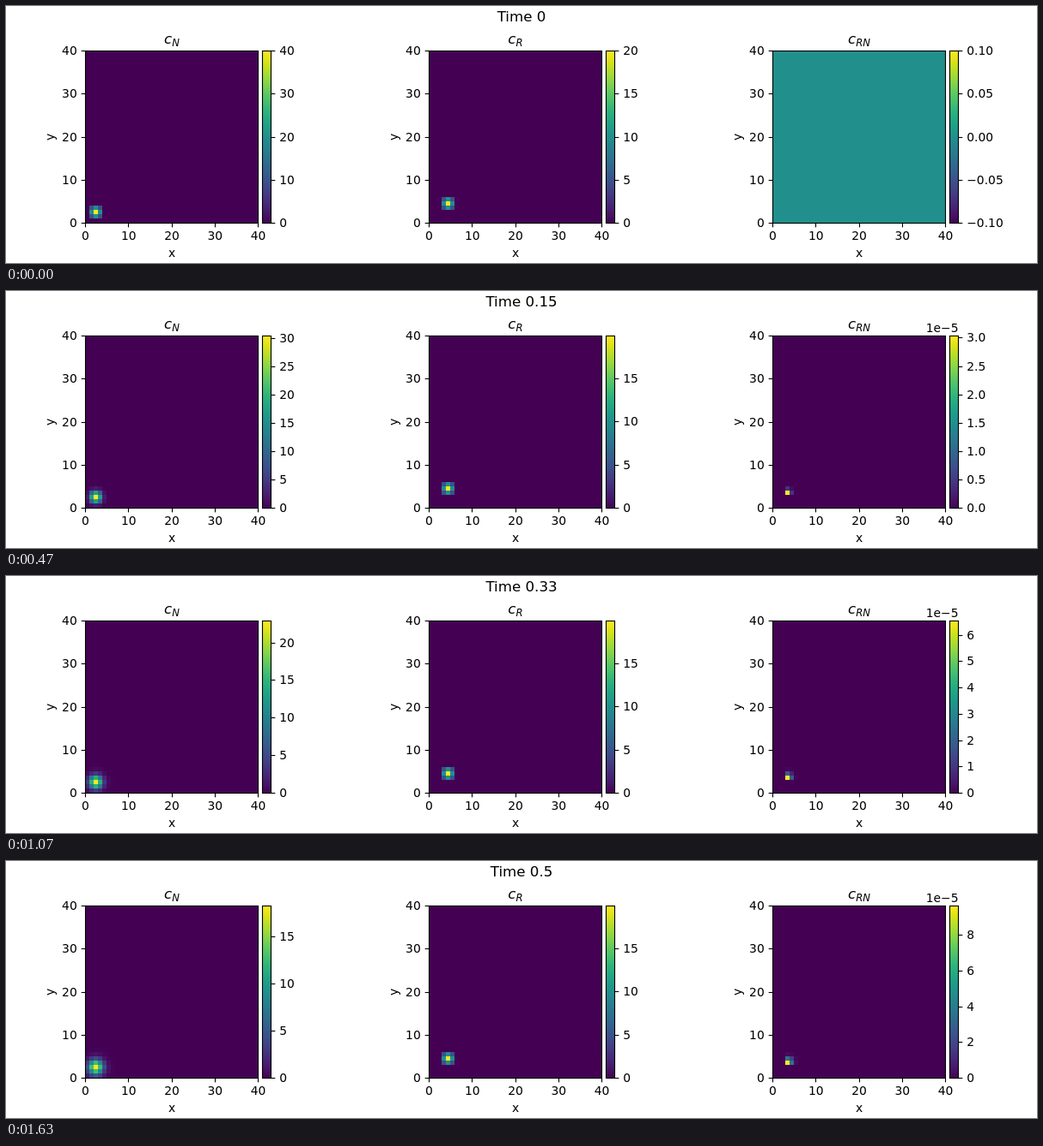
Write an HTML page with a canvas that moves like this. It is 1200 px wide and 300 px high and loops after 1660 ms.

```html
<!DOCTYPE html>
<html lang="en">
<head>
<meta charset="utf-8">
<title>Reaction and diffusion</title>
<style>
html, body { margin: 0; width: 1200px; height: 300px; overflow: hidden; background: #fff; }
canvas { display: block; }
</style>
</head>
<body>
<canvas id="stage" width="1200" height="300"></canvas>
<script>
const ctx = document.getElementById('stage').getContext('2d');
const LOOP = 1660, CELLS = 40, DT = 0.01, STEPS = 50;
const LEFT = 92.5, TOP = 52.5, SIZE = 201, BOTTOM = TOP + SIZE;
const BAR_X = 298.5, BAR_W = 10, TICK = 4.86, LINE = 1.11;
const SMALL = 13.89, LARGE = 16.67;

// Viridis, evenly spaced stops
const STOPS = ('440154 481769 472a7a 433d84 3d4e8a 355e8d 2e6d8e 297b8e 23898e ' +
  '1f978b 21a585 2db27d 46c06f 65cb5e 8bd646 b2dd2d dae319 fde725').split(' ')
  .map(hex => [0, 2, 4].map(i => parseInt(hex.slice(i, i + 2), 16)));

function viridis(v) {
  const p = Math.min(Math.max(v, 0), 1) * (STOPS.length - 1);
  const i = Math.min(Math.floor(p), STOPS.length - 2);
  return `rgb(${STOPS[i].map((c, j) => Math.round(c + (STOPS[i + 1][j] - c) * (p - i)))})`;
}

const barFill = ctx.createLinearGradient(0, BOTTOM, 0, TOP);
STOPS.forEach((c, i) => barFill.addColorStop(i / (STOPS.length - 1), `rgb(${c})`));

// Concentration fields
function blob(center, peak) {
  const field = new Float64Array(CELLS * CELLS);
  for (let dy = -1; dy <= 1; dy++)
    for (let dx = -1; dx <= 1; dx++)
      field[(center + dy) * CELLS + center + dx] = peak / 2 ** (Math.abs(dx) + Math.abs(dy));
  return field;
}

// One implicit diffusion step with closed walls
function diffuse(field, rate) {
  const a = rate * DT, last = CELLS - 1;
  const next = field.slice();
  for (let pass = 0; pass < 6; pass++)
    for (let y = 0; y < CELLS; y++)
      for (let x = 0; x < CELLS; x++) {
        const at = y * CELLS + x;
        const around = next[x ? at - 1 : at] + next[x < last ? at + 1 : at] +
          next[y ? at - CELLS : at] + next[y < last ? at + CELLS : at];
        next[at] = (field[at] + a * around) / (1 + 4 * a);
      }
  return next;
}

const states = [[blob(2, 40), blob(4, 20), new Float64Array(CELLS * CELLS)]];
for (let s = 0; s < STEPS; s++) {
  const [n, r, rn] = states[s];
  const n2 = diffuse(n, 1), r2 = diffuse(r, 0.001);
  states.push([n2, r2, rn.map((c, i) => c + DT * 4.08e-6 * n2[i] * r2[i])]);
}

// Drawing helpers
const snap = v => Math.round(v - 0.5) + 0.5;

function text(str, x, y, size, align = 'center', style = '') {
  ctx.font = `${style} ${size}px "DejaVu Sans", sans-serif`;
  ctx.textAlign = align;
  ctx.fillStyle = '#000';
  ctx.fillText(str, x, y);
  return ctx.measureText(str).width;
}

function line(x1, y1, x2, y2) {
  ctx.beginPath();
  ctx.moveTo(x1, y1);
  ctx.lineTo(x2, y2);
  ctx.stroke();
}

function heading(sub) {
  const subSize = LARGE * 0.7;
  ctx.font = `italic ${subSize}px "DejaVu Sans", sans-serif`;
  const x = LEFT + SIZE / 2 - (ctx.measureText(sub).width + LARGE * 0.55) / 2;
  const w = text('c', x, 44, LARGE, 'left', 'italic');
  text(sub, x + w, 47, subSize, 'left', 'italic');
}

function heatmap(field, lo, hi) {
  const edge = i => Math.round(i * SIZE / CELLS);
  const color = v => viridis((v - lo) / (hi - lo));
  ctx.fillStyle = color(0);
  ctx.fillRect(LEFT, TOP, SIZE, SIZE);
  field.forEach((v, i) => {
    if (v < hi * 0.001) return;
    const x = i % CELLS, y = Math.floor(i / CELLS);
    ctx.fillStyle = color(v);
    ctx.fillRect(LEFT - 0.5 + edge(x), BOTTOM - 0.5 - edge(y + 1),
      edge(x + 1) - edge(x), edge(y + 1) - edge(y));
  });
}

function axes() {
  ctx.strokeRect(LEFT, TOP, SIZE, SIZE);
  for (let v = 0; v <= 40; v += 10) {
    const d = v * SIZE / CELLS, x = snap(LEFT + d), y = snap(BOTTOM - d);
    line(x, BOTTOM, x, BOTTOM + TICK);
    line(LEFT, y, LEFT - TICK, y);
    text(v, LEFT + d, 273, SMALL);
    text(v, LEFT - 2 * TICK, Math.round(y + 4.6), SMALL, 'right');
  }
  text('x', LEFT + SIZE / 2, 293, SMALL);
  ctx.save();
  ctx.translate(56, TOP + SIZE / 2);
  ctx.rotate(-Math.PI / 2);
  text('y', 0, 0, SMALL);
  ctx.restore();
}

function colorbar(lo, hi) {
  const raw = (hi - lo) / 7, power = 10 ** Math.floor(Math.log10(raw));
  const step = power * [1, 2, 2.5, 5, 10].find(m => m * power >= raw * (1 - 1e-9));
  const first = Math.ceil(lo / step - 1e-9), last = Math.floor(hi / step + 1e-9);
  const order = Math.floor(Math.log10(last * step) + 1e-9);
  const scale = order <= -5 ? 10 ** order : 1;
  const unit = step / scale;
  let digits = 0;
  while (Math.abs(unit * 10 ** digits - Math.round(unit * 10 ** digits)) > 1e-6) digits++;

  const right = BAR_X + BAR_W;
  ctx.fillStyle = barFill;
  ctx.fillRect(BAR_X, TOP, BAR_W, SIZE);
  for (let i = first; i <= last; i++) {
    const y = snap(BOTTOM - (i * step - lo) / (hi - lo) * SIZE);
    line(right, y, right + TICK, y);
    text((i * unit).toFixed(digits).replace('-', '−'),
      right + 2 * TICK, Math.round(y + 4.6), SMALL, 'left');
  }
  ctx.strokeRect(BAR_X, TOP, BAR_W, SIZE);
  if (scale < 1) text('1e−' + -order, right, 48, SMALL, 'right');
}

function draw(ms) {
  const tick = Math.floor(0.3 * Math.floor(ms / 10) + 0.15);
  const step = tick ? tick + 1 : 0;
  ctx.fillStyle = '#fff';
  ctx.fillRect(0, 0, 1200, 300);
  ctx.strokeStyle = '#000';
  ctx.lineWidth = LINE;
  text('Time ' + step / 100, 600, 18, LARGE);
  states[step].forEach((field, i) => {
    const peak = Math.max(...field);
    const [lo, hi] = peak ? [0, peak] : [-0.1, 0.1];
    ctx.save();
    ctx.translate(400 * i, 0);
    heatmap(field, lo, hi);
    axes();
    heading(['N', 'R', 'RN'][i]);
    colorbar(lo, hi);
    ctx.restore();
  });
}

const start = performance.now();
function frame() {
  draw((performance.now() - start) % LOOP);
  requestAnimationFrame(frame);
}
frame();
</script>
</body>
</html>
```
